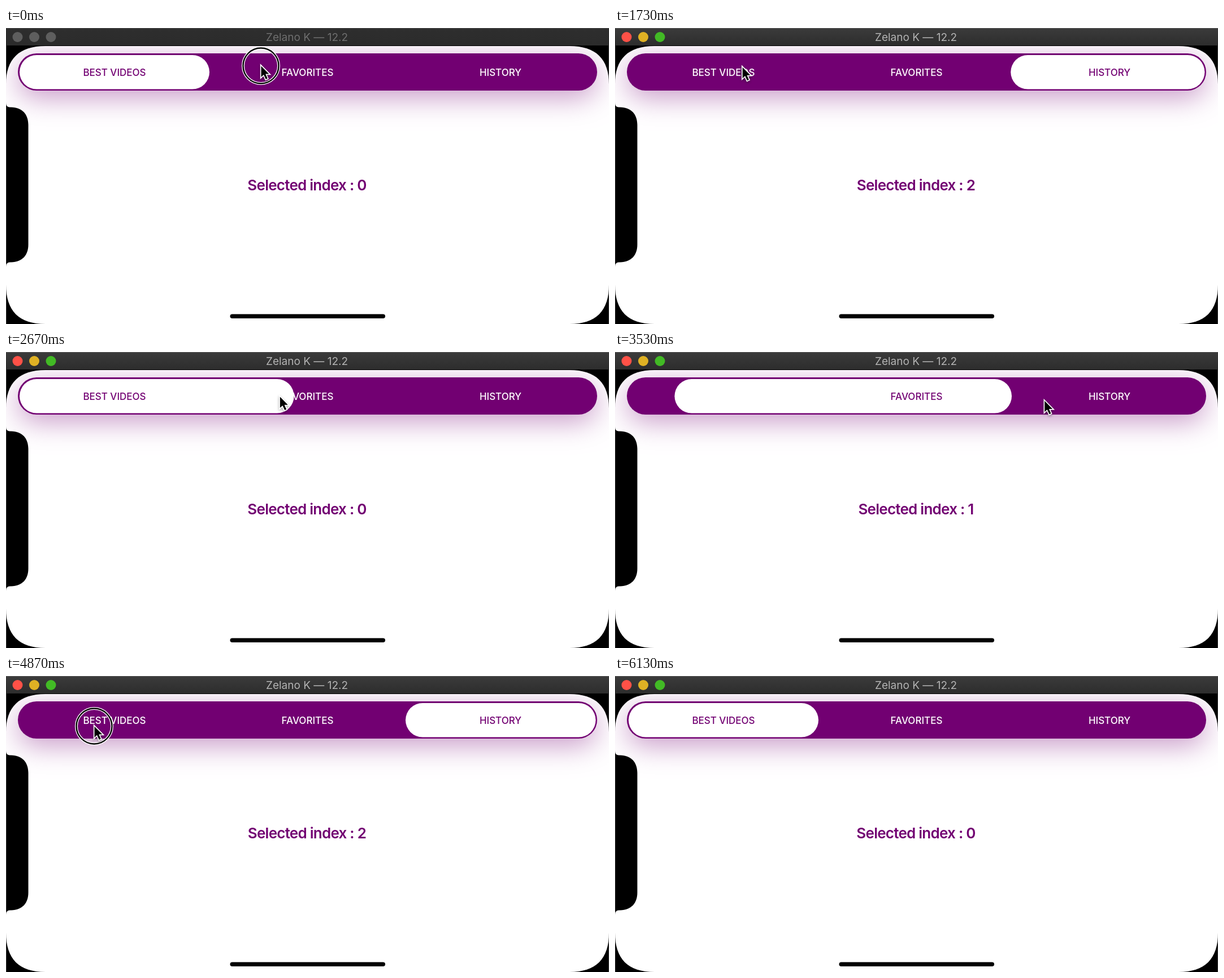
These frames come from a looping animation (1067x525 px, 6.54 s). An HTML page with a canvas:

```html
<!DOCTYPE html>
<html lang="en">
<head>
<meta charset="utf-8">
<title>Segmented control</title>
<style>
html, body { margin: 0; width: 100%; height: 100%; overflow: hidden; background: #000; }
canvas { display: block; }
</style>
</head>
<body>
<canvas id="stage" width="1067" height="525"></canvas>
<script>
const W = 1067, H = 525, LOOP = 6540, STRETCH = 400;
const PURPLE = '#720072';
const c = document.getElementById('stage').getContext('2d');

const tabs = [
  { text: 'BEST VIDEOS', x: 192, left: 24, right: 360 },
  { text: 'FAVORITES', x: 533.5, left: 365, right: 702 },
  { text: 'HISTORY', x: 875, left: 707, right: 1043.5 }
];

// [time the tab is released, previous tab, new tab]
const taps = [[154, 0, 1], [966, 1, 2], [1994, 2, 0], [3000, 0, 1], [4022, 1, 2], [4994, 2, 0]];

// [departure, arrival, x, y]: the pointer rests between moves
const moves = [
  [0, 0, 451, 66], [160, 790, 853, 60], [1000, 1835, 200, 68.5], [2060, 2890, 540, 80],
  [3050, 3840, 870, 88], [4070, 4790, 156, 88]
];

const clamp = v => Math.max(0, Math.min(1, v));
const ease = v => (1 - Math.cos(Math.PI * clamp(v))) / 2;
const mix = (a, b, k) => a + (b - a) * k;

function fillBox(x, y, w, h, r, color) {
  c.fillStyle = color;
  c.beginPath();
  c.roundRect(x, y, w, h, r);
  c.fill();
}

function dot(x, y, r, color) {
  c.fillStyle = color;
  c.beginPath();
  c.arc(x, y, r, 0, 7);
  c.fill();
}

function label(text, x, y, font, color, spacing = 0) {
  c.font = font + ' Inter, sans-serif';
  c.letterSpacing = spacing + 'px';
  c.textAlign = 'center';
  c.fillStyle = color;
  c.fillText(text, x, y);
}

function titleBar(active) {
  const g = c.createLinearGradient(0, 0, 0, 31);
  g.addColorStop(0, active ? '#3b3b3b' : '#2e2e2e');
  g.addColorStop(1, active ? '#2d2d2d' : '#2b2b2b');
  c.fillStyle = g;
  c.fillRect(0, 0, W, 31);
  c.fillStyle = active ? '#626262' : '#505050';
  c.fillRect(0, 0, W, 1);
  ['#ff5147', '#dfb124', '#42ba25'].forEach((color, i) =>
    dot(20.5 + 29.5 * i, 16, 9, active ? color : '#5e5e5e'));
  label('Zelano K — 12.2', 532.5, 23, '400 19px', active ? '#b4b4b4' : '#6f6f6f');
}

const screen = new Path2D(`M0 100 C0 55 23 32 70 32 H997 C1044 32 1067 55 1067 100
  V455 C1067 502 1044 525 997 525 H70 C23 525 0 502 0 455 V424
  C0 417 3 415.5 9 415.5 C29 415 39.5 403 39.5 384 V172
  C39.5 153 29 141 9 140.5 C3 140.5 0 139 0 132 Z`);

function pillAt(tap, t) {
  const a = tabs[tap[1]], b = tabs[tap[2]];
  const grow = ease((t - tap[0]) / STRETCH);
  const shrink = ease((t - tap[0] - STRETCH) / STRETCH);
  const forward = tap[2] > tap[1];
  return {
    grow,
    left: mix(a.left, b.left, forward ? shrink : grow),
    right: mix(a.right, b.right, forward ? grow : shrink)
  };
}

function control(t) {
  const tap = taps.findLast(s => s[0] <= t) || [-2000, 0, 0];
  const held = taps.find(s => t > s[0] - 110 && t < s[0]);
  const pill = pillAt(tap, t);

  c.save();
  c.shadowColor = 'rgba(114,0,114,.4)';
  c.shadowBlur = 50;
  c.shadowOffsetY = 12;
  fillBox(21, 45, 1025, 66, 33, PURPLE);
  c.restore();
  fillBox(pill.left, 48, pill.right - pill.left, 60.5, 30.25, '#fff');

  tabs.forEach((tab, i) => {
    let k = i === tap[2] ? pill.grow : i === tap[1] ? 1 - pill.grow : 0;
    if (tap[1] === tap[2]) k = i === 0 ? 1 : 0;
    const rg = mix(255, 114, k), g = mix(255, 0, k);
    const alpha = held && held[2] === i ? 0.18 : 1;
    label(tab.text, tab.x, 84.5, '500 17px', `rgba(${rg},${g},${rg},${alpha})`);
  });
  label('Selected index : ' + tap[2], 532.5, 288, '600 26px', PURPLE, -0.75);
}

const arrow = new Path2D('M1.5 3.5 V23 L6 18.8 L9.8 27 L12.8 25.6 L9.2 17.6 H15.4 Z');

function pointer(t) {
  if (t >= 6130) return;
  const n = moves.findLastIndex(m => m[0] <= t);
  const to = moves[n], from = moves[Math.max(0, n - 1)];
  const k = n ? ease((t - to[0]) / (to[1] - to[0])) : 1;
  const x = mix(from[2], to[2], k), y = mix(from[3], to[3], k);

  if (taps.some(s => t > s[0] - 170 && t < s[0] - 60)) {
    for (const [width, color] of [[5, '#fff'], [2.4, '#000']]) {
      c.lineWidth = width;
      c.strokeStyle = color;
      c.beginPath();
      c.arc(x, y + 1, 31.5, 0, 7);
      c.stroke();
    }
  }
  c.save();
  c.translate(x - 1, y - 2);
  c.shadowColor = 'rgba(0,0,0,.35)';
  c.shadowBlur = 4;
  c.shadowOffsetY = 2;
  c.lineWidth = 3.4;
  c.strokeStyle = '#fff';
  c.stroke(arrow);
  c.shadowColor = 'transparent';
  c.fillStyle = '#000';
  c.fill(arrow);
  c.restore();
}

function draw(now) {
  const t = now % LOOP;
  c.fillStyle = '#000';
  c.fillRect(0, 0, W, H);
  c.fillStyle = '#3c3c3c';
  c.fillRect(0, 31, 1, H);
  c.fillRect(W - 1, 31, 1, H);
  titleBar(t >= 70);
  c.save();
  c.clip(screen);
  c.fillStyle = '#fff';
  c.fillRect(0, 31, W, H);
  control(t);
  c.restore();
  fillBox(396.5, 507.5, 274.5, 7.5, 3.75, '#000');
  pointer(t);
}

let start;
function tick(now) {
  start ??= now;
  draw(now - start);
  requestAnimationFrame(tick);
}
draw(0);
requestAnimationFrame(tick);
</script>
</body>
</html>
```
